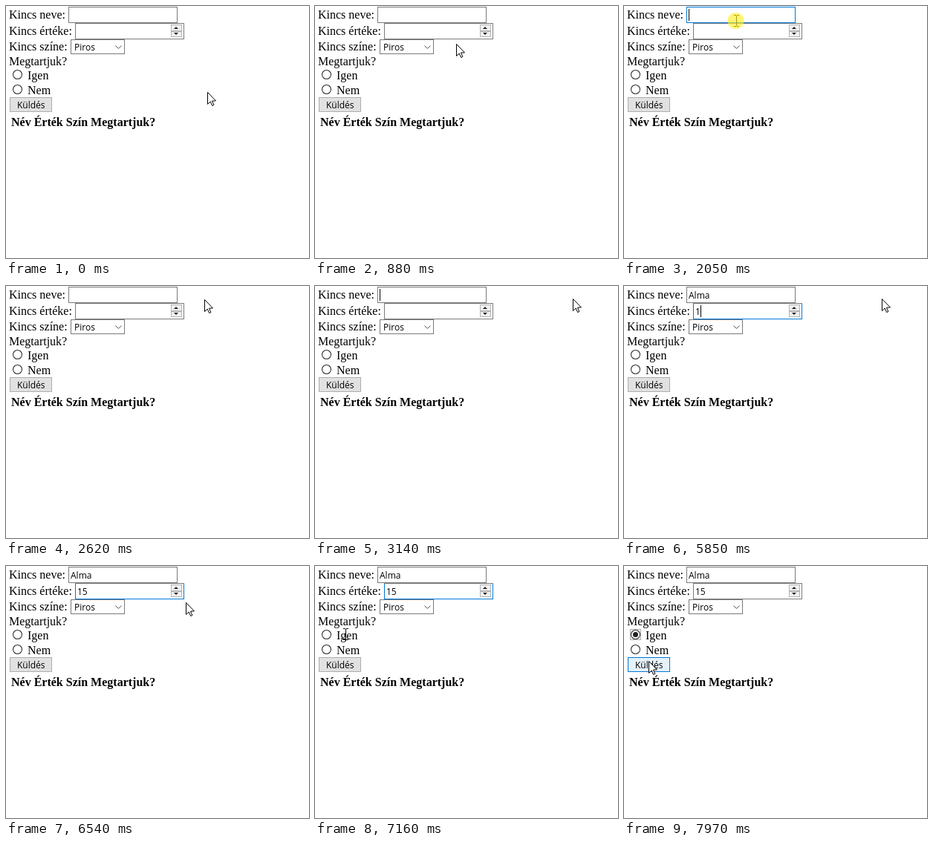
An HTML page with a canvas that plays this animation: 408 by 340 pixels, repeating every 8000 ms.

```html
<!DOCTYPE html>
<html lang="hu">
<head>
<meta charset="utf-8">
<title>Kincsek</title>
<style>
html, body { margin: 0; width: 100%; height: 100%; overflow: hidden; background: #fff; }
canvas { display: block; }
</style>
</head>
<body>
<canvas id="stage" width="408" height="340"></canvas>
<script>
const ctx = document.getElementById('stage').getContext('2d');
const LOOP = 8000;
const SERIF = '16px "Liberation Serif", serif';
const SANS = '12px "Open Sans", sans-serif';
const GREY = '#7a7a7a', BLUE = '#0078d7', DARK = '#171717';

// Pointer moves: start, end, number of steps, destination
const moves = [
  [510, 1080, 13, 150, 19],
  [1400, 1400, 1, 151, 20],
  [2190, 2950, 16, 347, 17],
  [6260, 6920, 15, 49, 108],
  [7060, 7160, 3, 41, 92],
  [7210, 7400, 5, 17, 94],
  [7600, 7820, 5, 35, 110],
  [7870, 7970, 3, 33, 128]
];
const clicks = [[2050, 2190], [7430, 7560]];

const between = (t, a, b) => t >= a && t < b;
const inside = (p, x, y, w, h) => between(p.x, x, x + w) && between(p.y, y, y + h);
const ease = k => k * k * (3 - 2 * k);

function pointerAt(t) {
  let x = 271, y = 116;
  for (const [start, end, steps, tx, ty] of moves) {
    if (t < start) break;
    const gap = (end - start) / (steps - 1) || 1;
    const k = ease(Math.min(1, (Math.floor((t - start) / gap + 1e-6) + 1) / steps));
    x += (tx - x) * k;
    y += (ty - y) * k;
  }
  return { x: Math.round(x), y: Math.round(y) };
}

function rect(color, x, y, w, h) {
  ctx.fillStyle = color;
  ctx.fillRect(x, y, w, h);
}

function box(x, y, w, h, border, fill = '#fff') {
  rect(border, x, y, w, h);
  rect(fill, x + 1, y + 1, w - 2, h - 2);
}

function text(str, x, y, font = SANS) {
  ctx.font = font;
  ctx.fillStyle = '#000';
  ctx.fillText(str, x, y);
}

function path(points, fill, stroke, close = true) {
  ctx.beginPath();
  points.forEach(([x, y]) => ctx.lineTo(x, y));
  if (close) ctx.closePath();
  if (fill) { ctx.fillStyle = fill; ctx.fill(); }
  if (stroke) { ctx.strokeStyle = stroke; ctx.lineWidth = 1; ctx.stroke(); }
}

function disc(x, y, r, fill, stroke) {
  ctx.beginPath();
  ctx.arc(x, y, r, 0, Math.PI * 2);
  if (fill) { ctx.fillStyle = fill; ctx.fill(); }
  if (stroke) { ctx.strokeStyle = stroke; ctx.lineWidth = 1.1; ctx.stroke(); }
}

function spinner() {
  box(222, 25, 15, 9, '#b4b4b4', '#f0f0f0');
  box(222, 34, 15, 8, '#b4b4b4', '#f0f0f0');
  path([[226, 31], [232, 31], [229, 28]], '#222');
  path([[226, 36], [232, 36], [229, 39]], '#222');
}

function radio(y, checked) {
  disc(15.5, y, 6, '#fff', '#333');
  if (!checked) return;
  disc(15.5, y, 3.5, '#222');
  ctx.strokeStyle = '#555';
  ctx.lineWidth = 1;
  ctx.setLineDash([1, 1]);
  ctx.strokeRect(8.5, 85.5, 14, 14);
  ctx.setLineDash([]);
}

function popup() {
  ctx.save();
  ctx.shadowColor = 'rgba(0,0,0,.45)';
  ctx.shadowBlur = 3;
  ctx.shadowOffsetX = ctx.shadowOffsetY = 2;
  rect('#fff', 83, 23, 148, 23);
  ctx.restore();
  box(83, 23, 148, 23, '#a0a0a0');
  text('Alma', 89, 39);
}

function arrow(x, y) {
  ctx.save();
  ctx.translate(x + .5, y + .5);
  path([[0, 0], [0, 16], [3.7, 12.5], [6.2, 18], [8.4, 17], [6, 11.6], [11, 11.4]], '#fff', '#000');
  ctx.restore();
}

function iBeam(x, y) {
  rect('#000', x, y - 7, 1, 14);
  for (const edge of [y - 8, y + 7]) {
    rect('#000', x - 3, edge, 3, 1);
    rect('#000', x + 1, edge, 3, 1);
  }
}

function overText(p) {
  return inside(p, 84, 1, 147, 22) || inside(p, 93, 23, 128, 22) ||
    inside(p, 29, 85, 29, 17) || inside(p, 29, 104, 32, 17);
}

function nameField(t, p) {
  const hover = inside(p, 84, 1, 147, 22);
  const focused = between(t, 2050, 4450);
  box(84, 1, 147, 22, hover ? (focused ? BLUE : DARK) : GREY);
  const typed = [3420, 3660, 3700, 3850].filter(at => t >= at).length;
  text('Alma'.slice(0, typed), 87, 17);
  if (between(t, 2050, 2580) || between(t, 3140, 4220)) {
    rect('#000', [87, 95, 98, 109, 116][typed], 4, 1, 16);
  }
}

function valueField(t) {
  const focused = between(t, 4450, 7430);
  box(93, 23, 147, 22, focused ? BLUE : GREY);
  if (focused) rect(GREY, 93, 23, 147, 1);
  spinner();
  const typed = [5850, 5900].filter(at => t >= at).length;
  text('15'.slice(0, typed), 96, 39);
  if (between(t, 4450, 4970) || between(t, 5480, 6510)) {
    rect('#000', 96 + typed * 7, 26, 1, 16);
  }
}

function draw(t) {
  const p = pointerAt(t);
  rect('#fff', 0, 0, 408, 340);

  text('Kincs neve:', 4, 17, SERIF);
  text('Kincs értéke:', 4, 39, SERIF);
  text('Kincs színe:', 4, 60, SERIF);
  text('Megtartjuk?', 4, 80, SERIF);
  text('Igen', 29, 99, SERIF);
  text('Nem', 29, 119, SERIF);
  text('Név Érték Szín Megtartjuk?', 7, 162, 'bold ' + SERIF);

  nameField(t, p);
  valueField(t);

  box(87, 45, 73, 20, GREY);
  text('Piros', 92, 60);
  path([[147.5, 53.5], [151.5, 57.5], [155.5, 53.5]], null, '#555', false);

  radio(92.5, t >= 7430);
  radio(112.5, false);

  const hover = inside(p, 5, 123, 57, 20);
  box(5, 123, 57, 20, hover ? BLUE : '#adadad', hover ? '#e5f1fb' : '#e1e1e1');
  text('Küldés', 15, 138);

  if (between(t, 3520, 4410)) popup();

  (overText(p) ? iBeam : arrow)(p.x, p.y);
  if (clicks.some(([a, b]) => between(t, a, b))) {
    disc(p.x - .5, p.y, 11, 'rgba(255,240,40,.65)');
  }
}

const begin = performance.now();
function frame() {
  draw((performance.now() - begin) % LOOP);
  requestAnimationFrame(frame);
}
frame();
</script>
</body>
</html>
```
